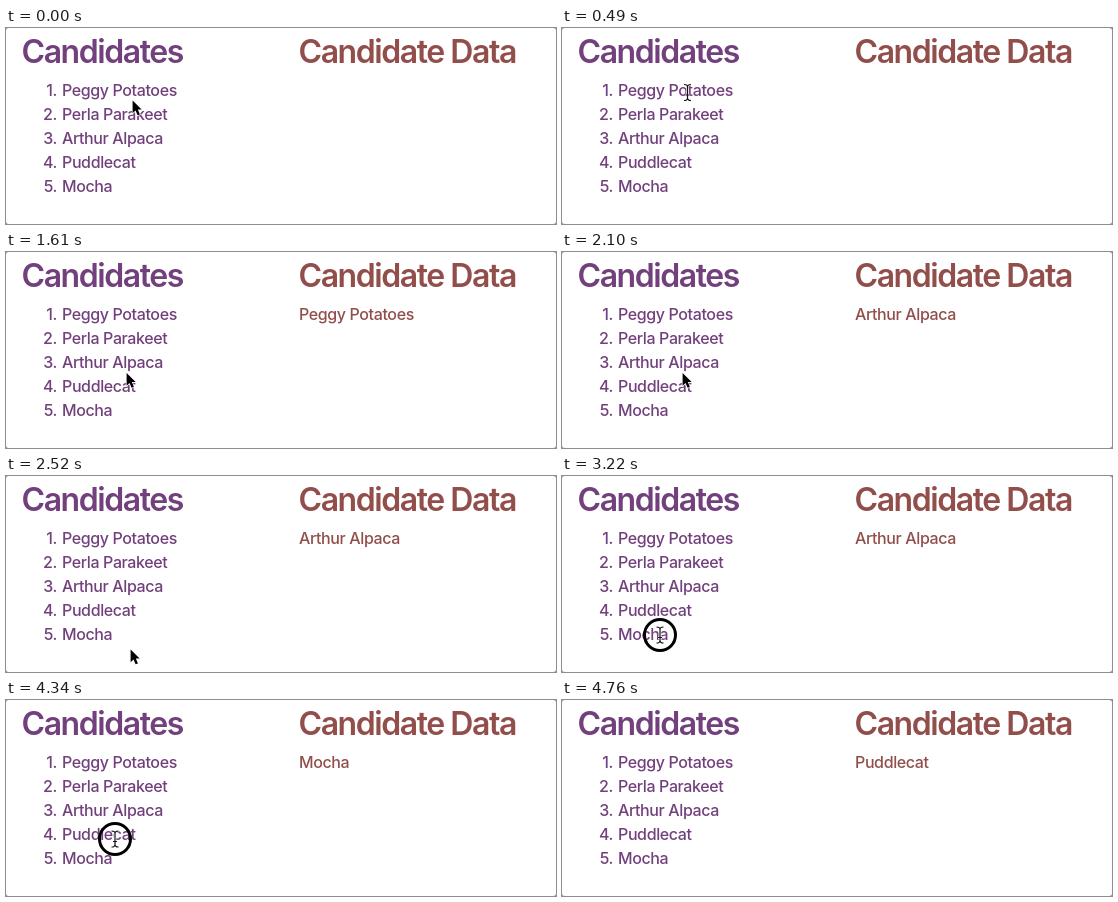
Write an HTML page that moves like this. It is 550 by 196 pixels and loops after 5250 ms.

```html
<!DOCTYPE html>
<html lang="en">
<head>
<meta charset="utf-8">
<title>Candidates</title>
<style>
  html, body { margin: 0; width: 100%; height: 100%; overflow: hidden; background: #999; }
  svg { display: block; width: 550px; height: 196px; background: #fff; border-radius: 3px; }
  text { font: 500 16px Inter, Roboto, sans-serif; letter-spacing: -0.024em; }
  .title { font-size: 32px; font-weight: 600; letter-spacing: -0.045em; }
  .list { fill: #72407c; }
  .data { fill: #914e4a; }
  .marker { text-anchor: end; }
</style>
</head>
<body>
<svg viewBox="0 0 550 196">
  <defs>
    <path id="beamShape" d="M-3.5 -8Q0 -8 0 -5.5Q0 -8 3.5 -8M0 -6V6M-3.5 8Q0 8 0 5.5Q0 8 3.5 8M-2 2.5H2"/>
  </defs>
  <g class="list" id="list"><text class="title" x="15.5" y="35">Candidates</text></g>
  <g class="data">
    <text class="title" x="292.5" y="35">Candidate Data</text>
    <text id="choice" x="293" y="68"></text>
  </g>
  <g id="cursor">
    <path id="arrow" transform="translate(.6 1.4) scale(.88)" d="M0 0V14.5L3.3 11.4L5.7 17L8.3 15.9L6 10.4H10.3Z" stroke="#fff" paint-order="stroke" stroke-width="1.6"/>
    <g id="beam" fill="none">
      <use href="#beamShape" stroke="#fff" stroke-width="2.6"/>
      <use href="#beamShape" stroke="#111" stroke-width="1.2"/>
    </g>
    <circle id="ring" r="15.5" fill="none" stroke="#000" stroke-width="3"/>
  </g>
</svg>
<script>
const LOOP = 5250, STEP = 70, HIDE_AT = 4760;
const GLIDE = 350, HOLD = 140;
const ROW = 24, FIRST_ROW = 62, TEXT_X = 56;
const names = ["Peggy Potatoes", "Perla Parakeet", "Arthur Alpaca", "Puddlecat", "Mocha"];

// The pointer leaves for each place at the given time and arrives GLIDE later
const origin = { x: 126, y: 71 };
const glides = [
  { at: 0, x: 125.5, y: 64.5 },
  { at: 980, x: 120, y: 119.5 },
  { at: 2170, x: 124, y: 172 },
  { at: 2520, x: 98, y: 159 },
  { at: 3430, x: 109, y: 139 },
  { at: 4410, x: 112, y: 166 }
];
const presses = [630, 1960, 3150, 4270];

const $ = id => document.getElementById(id);
const show = (id, visible) => $(id).setAttribute("visibility", visible ? "inherit" : "hidden");
const smooth = p => p * p * (3 - 2 * p);
const rowAt = y => Math.round((y - FIRST_ROW) / ROW);

function addText(content, x, y, className = "") {
  const text = document.createElementNS("http://www.w3.org/2000/svg", "text");
  text.setAttribute("x", x);
  text.setAttribute("y", y);
  text.setAttribute("class", className);
  text.textContent = content;
  $("list").append(text);
  return text;
}

const rows = names.map((name, i) => {
  const baseline = FIRST_ROW + 6 + i * ROW;
  addText(`${i + 1}.`, 51, baseline, "marker");
  return addText(name, TEXT_X, baseline);
});

function pointerAt(t) {
  let { x, y } = origin;
  for (const glide of glides) {
    const p = smooth(Math.min(1, Math.max(0, (t - glide.at) / GLIDE)));
    x += (glide.x - x) * p;
    y += (glide.y - y) * p;
  }
  return { x, y };
}

function isOverText({ x, y }) {
  const i = rowAt(y);
  return i in rows && Math.abs(y - FIRST_ROW - i * ROW) < 9
    && x < TEXT_X + rows[i].getComputedTextLength();
}

function draw(now) {
  const t = Math.floor(now % LOOP / STEP) * STEP;
  const pointer = pointerAt(t);
  const overText = isOverText(pointer);
  const press = presses.findLast(time => t >= time + HOLD);

  $("cursor").setAttribute("transform", `translate(${pointer.x} ${pointer.y})`);
  show("cursor", t < HIDE_AT);
  show("arrow", !overText);
  show("beam", overText);
  show("ring", presses.some(time => t >= time && t < time + HOLD));
  $("choice").textContent = press ? names[rowAt(pointerAt(press).y)] : "";
}

const start = performance.now();
function tick() {
  draw(performance.now() - start);
  requestAnimationFrame(tick);
}
tick();
</script>
</body>
</html>
```
